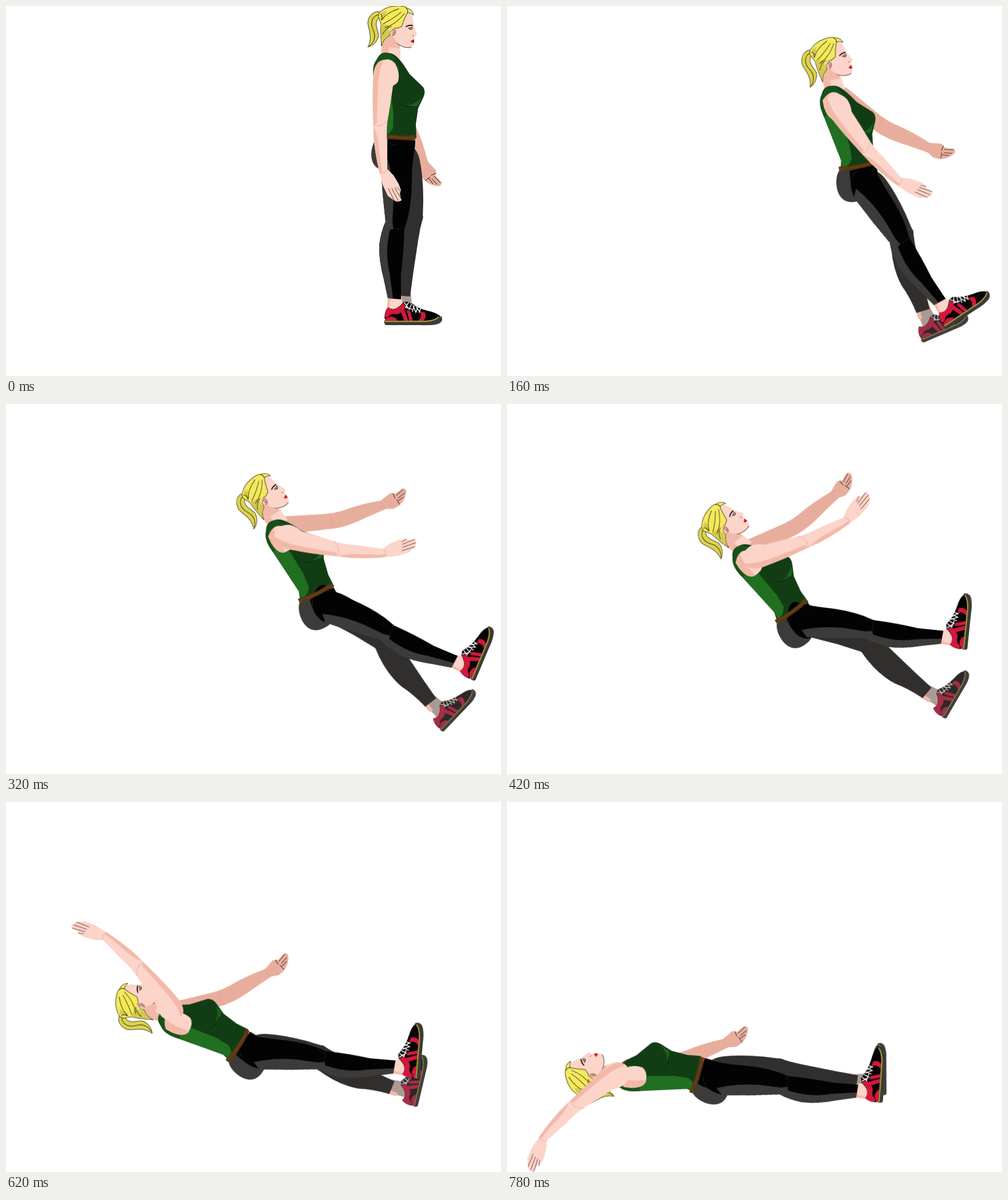
Write an HTML page that moves like this. It is 866x647 px and loops after 0.8 s.

```html
<!DOCTYPE html>
<html lang="en">
<head>
<meta charset="utf-8">
<title>Falling backwards</title>
<style>
html, body { margin: 0; width: 100%; height: 100%; overflow: hidden; background: #fff; }
svg { display: block; width: 866px; height: 647px; }

/* two straight moves of 400 ms, drawn every 20 ms */
.body, .joint { animation: 800ms steps(20) infinite; }
.body { animation-name: fall; }
.joint { animation-name: turn; }
@keyframes fall {
  0% { transform: translate(0, 0); }
  50% { transform: translate(-177px, 128px); }
  100% { transform: translate(-360px, 255px); }
}
@keyframes turn {
  0% { transform: rotate(0deg); }
  50% { transform: rotate(var(--mid)); }
  100% { transform: rotate(var(--end)); }
}
.torso { transform-origin: 684px 229px; --mid: -30deg; --end: -86deg; }
.pelvis { transform-origin: 684px 229px; --mid: -38deg; --end: -80deg; }
.head { transform-origin: 673px 88px; --mid: -17deg; --end: -23deg; }
.near-arm { transform-origin: 672px 104px; --mid: -72deg; --end: -237deg; }
.far-arm { transform-origin: 674px 102px; --mid: -77deg; --end: -1deg; }
.near-leg { transform-origin: 670px 253px; --mid: -46deg; --end: -6deg; }
.far-leg { transform-origin: 692px 256px; --mid: -24deg; --end: -6deg; }
.far-shin { transform-origin: 709px 373px; --mid: 9deg; --end: -3deg; }
.far-foot { transform-origin: 702px 508px; --mid: -5deg; --end: -3deg; }

.skin { fill: #fcd4c9; }
.blush { fill: #f2b9a8; }
.tan { fill: #e8ae9d; }
.hair { fill: #f3e95a; stroke: #2a2710; stroke-width: .9; }
.tail { fill: #dcd351; stroke: #2a2710; stroke-width: .9; }
.ochre { fill: #d3c94d; }
.gray { fill: #3c3b3a; }
.dim { fill: #302f2d; }
.line { fill: none; stroke: #1b1410; stroke-width: 1; stroke-linecap: round; }
.crease { fill: none; stroke: #d99f8e; stroke-width: .8; }
.shoe { --red: #d2183d; --black: #060506; --sole: #3b3a39; --gold: #b6a02f; --lace: #fff; }
.worn { --red: #a82c45; --black: #2b2829; --sole: #413f3e; --gold: #8c7b35; --lace: #cfcac8; }
.red { fill: var(--red); }
.black { fill: var(--black, #030303); }
.sole { fill: var(--sole); }
.gold { fill: none; stroke: var(--gold); stroke-width: 1.8; }
.lace { fill: none; stroke: var(--lace); stroke-width: 1.5; stroke-linecap: round; }
</style>
</head>
<body>
<svg viewBox="0 0 866 647">
  <defs>
    <g id="shoe">
      <path class="black" d="M663 549 Q660 538 668 527 Q681 536 695 518 L703 517 Q716 528 738 533 Q758 537 760 548 L757 553 H664Z"/>
      <path class="red" d="M663 545 Q662 534 668 527 Q682 536 695 519 L699 526 Q694 537 684 539 Q672 537 669 544Z"/>
      <path class="red" d="M663 547 L673 543 Q683 544 685 551 H663Z M690 533 L697 531 L704 551 H697Z M701 532 L707 533 L712 551 H706Z"/>
      <path class="red" d="M724 534 L733 536 Q737 545 729 551 H720 Q730 543 724 534Z"/>
      <path class="sole" d="M662 550 H735 Q752 550 759 541 Q762 549 756 554 Q748 559 725 558 H665 Q661 557 662 550Z"/>
      <path class="gold" d="M663 551.5 H734 Q751 550 757 544"/>
      <path class="lace" d="M697 519 L703 527 M704 519 L699 527 L710 530 M709 522 L705 531 M714 525 L711 534 M712 524 L717 535 M720 528 L717 536 M718 527 L724 535 M725 530 L723 536"/>
    </g>
  </defs>

  <g class="body">
    <g class="joint torso">
      <g class="joint far-arm">
        <path class="tan" d="M665 102 Q681 82 697 103 L706 170 Q708 188 715 206 Q729 236 738 272 L752 287 V297 L762 308 Q762 316 755 315 Q742 314 732 305 L725 295 L724 282 L706 248 Q686 214 682 190Z"/>
        <path class="crease" d="M683 196 Q695 186 708 186 M724 281 Q729 273 738 272"/>
        <path class="line" d="M734 305 L742 299 M747 311 L740 302 M754 312 L745 302 M760 309 L749 298 M752 292 L744 296"/>
      </g>

      <g class="joint head">
        <path class="blush" d="M660 52 L657 68 L656 92 L690 95 L689 70 L700 62 L684 46Z"/>
        <path class="skin" d="M670 72 L668 94 L690 94 L690 74Z"/>
        <path class="skin" d="M690 12 L709 14 Q713 23 713 34 L719 49 Q719 53 714 54 L714 65 Q711 74 704 73 Q691 72 684 65 L674 48Z"/>
        <path class="tail" d="M657 11 C647 7 635 13 633 29 C634 42 642 54 633 72 Q648 68 652 52 C650 39 643 30 653 20Z"/>
        <path class="line" d="M653 15 C638 17 638 33 642 41 C648 54 644 63 636 70"/>
        <path class="hair" d="M653 23 Q649 14 656 9 Q668 0 682 0 Q697 -1 702 4 Q711 6 713 16 Q707 11 702 12 Q696 24 692 36 L684 39 Q672 36 671 52 Q660 57 657 70 Q655 48 656 31Z"/>
        <path class="ochre" d="M656 31 L670 34 L670 51 Q660 57 658 66Z M657 11 L666 9 L661 23 L655 24Z"/>
        <path class="line" d="M657 25 Q666 11 687 5 M660 31 Q675 24 691 11 M663 38 Q683 32 697 13 M659 49 Q665 38 674 36 M700 3 Q704 7 703 12 M655 14 Q660 16 657 24"/>
        <path class="blush" d="M673 43 Q675 37 681 39 Q685 46 680 52 Q674 55 673 43Z"/>
        <path class="line" style="stroke-width:.7" d="M675 43 Q682 38 681 46 Q680 52 676 51 M678 45 V49"/>
        <path class="line" style="stroke-width:1.8" d="M700 36 Q705 33 711 34"/>
        <path class="line" style="stroke-width:1.3" d="M704 39 L711 37 M706 40 Q709 42 711 39"/>
        <path class="line" style="stroke-width:.8" d="M713 53 L711 51 M684 65 Q691 72 704 73 L709 72"/>
        <path d="M714 58 L708 61 Q710 65 714 64Z" fill="#c81725"/>
      </g>

      <path d="M660 82 Q675 80 684 89 Q694 99 706 119 L730 142 Q735 150 730 160 L721 179 L717 207 L718 231 L654 229 L658 213 L645 135 Q639 109 647 97 Q652 84 660 82Z" fill="#123d14"/>
      <path d="M643 118 L658 213 L657 229 L671 222 L677 214 L678 190 L672 142Z" fill="#216f21"/>
      <path d="M660 82 Q670 80 678 88 L688 108 L684 125 L645 132 Q638 105 649 93Z" fill="#175119"/>
      <path d="M701 174 Q718 172 727 160 L721 174 Q712 178 701 174Z" fill="#1f601f"/>
      <path class="line" style="stroke:#061d08" d="M688 171 Q699 178 712 175"/>
      <path class="skin" d="M648 104 Q667 84 681 101 Q690 117 686 132 Q680 142 662 141 Q647 136 648 104Z"/>
      <path class="blush" d="M648 104 Q656 96 663 94 Q659 112 665 141 Q647 139 648 104Z"/>
    </g>

    <g class="joint pelvis">
      <g class="joint far-leg">
        <g class="joint far-shin">
          <g class="joint far-foot">
            <path fill="#a99b93" d="M685 498 H708 L710 522 L703 533 L684 532Z"/>
            <path fill="#efb9aa" d="M683 500 L691 502 L688 519 L682 517Z"/>
            <use href="#shoe" class="shoe worn" transform="translate(56.3 39) scale(.93)"/>
          </g>
          <path class="dim" d="M688 370 L730 368 Q724 389 721 410 L712 470 L707 508 L683 506 Q682 474 676 452 Q671 414 688 370Z"/>
        </g>
        <path class="dim" d="M667 262 Q679 240 700 240 Q719 246 724 270 Q730 299 730 340 L729 374 Q718 390 690 382 L681 326Z"/>
      </g>

      <path class="gray" d="M651 228 C640 238 635 263 643 276 Q651 290 675 288 L704 279 Q716 260 716 235Z"/>
      <path class="black" d="M669 233 L716 235 Q716 260 703 280 L680 286 Q657 274 669 233Z"/>

      <g class="joint near-leg">
        <path class="skin" d="M668 505 L691 507 L694 520 Q683 538 667 530Z"/>
        <path class="blush" d="M668 510 L674 512 Q669 520 672 530 L667 529Z"/>
        <use href="#shoe" class="shoe"/>
        <path class="black" d="M656 276 Q662 241 690 239 Q712 238 715 250 Q710 275 710 305 Q710 340 703 370 L697 390 Q696 430 691 468 V513 L668 511 L661 478 Q652 444 653 418 Q656 394 664 377 L659 329Z"/>
        <path class="gray" d="M655 277 L667 266 Q678 300 678 340 L676 378 L678 390 L672 391 Q662 430 671 465 L677 511 L668 511 L661 478 Q652 444 653 418 Q656 394 664 377 L659 329Z"/>
        <path class="line" style="stroke:#1c1b1b" d="M678 389 Q688 391 697 388"/>
        <path class="line" style="stroke:#242322" d="M667 250 Q672 243 684 241"/>
      </g>

      <path d="M652 221 Q684 229 717 226 L716 234 Q684 236 651 228Z" fill="#58350f"/>
      <path class="line" style="stroke:#7b4d1e" d="M653 225 Q684 232 716 230"/>
    </g>

    <g class="joint torso">
      <g class="joint near-arm">
        <path class="skin" d="M643 116 Q648 93 664 94 Q684 98 685 119 Q683 132 677 140 Q673 170 668 198 Q665 214 667 240 V285 L678 296 L687 311 L691 322 L689 328 L692 340 Q685 344 679 340 L668 332 L659 313 L653 290 Q645 255 643 227 Q640 160 643 116Z"/>
        <path class="blush" d="M643 116 Q648 96 661 94 Q652 112 651 140 Q649 177 649 205 L643 208 Q640 160 643 116Z M643 212 Q649 220 652 243 Q654 270 658 291 L653 290 Q645 255 643 227Z"/>
        <path class="crease" d="M643 208 Q656 214 668 199 M653 290 Q659 296 667 286"/>
        <path class="line" style="stroke:#5a342b" d="M686 340 L675 319 M679 340 L669 319 M692 338 L680 318 M690 324 L684 317"/>
      </g>
    </g>
  </g>
</svg>
</body>
</html>
```
